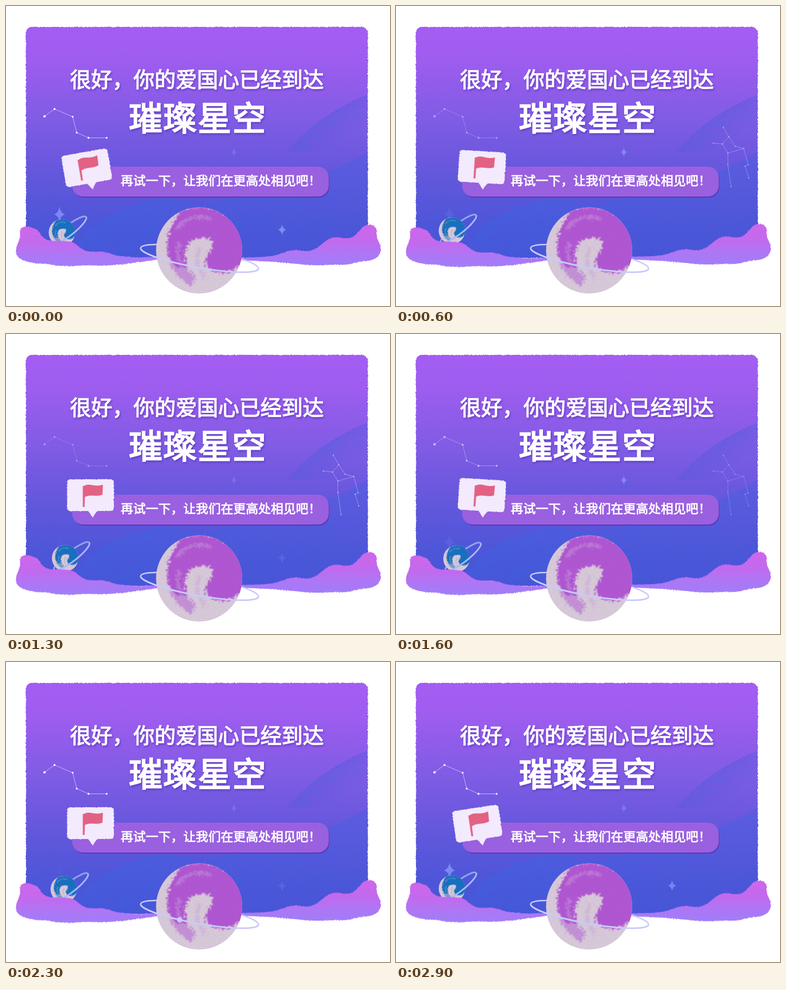
These frames come from a looping animation (847x661 px, 3000 ms). An HTML page:

```html
<!DOCTYPE html>
<html lang="zh-CN">
<head>
<meta charset="utf-8">
<style>
  html, body { margin: 0; width: 100%; height: 100%; overflow: hidden; background: #fff; }
  main { position: relative; width: 847px; height: 661px; max-height: 100%; overflow: hidden; contain: strict; }
  svg { position: absolute; left: 0; top: 0; width: 847px; height: 661px; will-change: transform; }
  text { font-family: "Noto Sans CJK SC", "Noto Sans CJK", sans-serif; fill: #fff; stroke: #fff; stroke-miterlimit: 2; }
  .shadow { filter: drop-shadow(2px 3px 2px rgba(70, 35, 165, .5)); }
  .line { fill: none; stroke: #cfcaff; stroke-width: 1; }
  .ring { fill: none; stroke: #c9cafb; stroke-width: 3.6; }
</style>
</head>
<body>
<main>

<!-- Card, hills, banner and text -->
<svg viewBox="0 0 847 661">
  <defs>
    <linearGradient id="sky" x2="0" y2="1">
      <stop offset="0" stop-color="#a45df2"/><stop offset=".13" stop-color="#9f5df0"/>
      <stop offset=".4" stop-color="#805be4"/><stop offset=".65" stop-color="#6258dc"/>
      <stop offset=".85" stop-color="#4e56d8"/><stop offset="1" stop-color="#4655d6"/>
    </linearGradient>
    <linearGradient id="cloud" x2="0" y2="1">
      <stop offset="0" stop-color="#cf66ea"/><stop offset=".4" stop-color="#c26aee"/>
      <stop offset=".75" stop-color="#ab78f6"/><stop offset="1" stop-color="#a27cf9"/>
    </linearGradient>
    <linearGradient id="fade" x1=".25" y1=".25" x2=".85" y2=".9">
      <stop offset="0" stop-opacity=".6"/><stop offset=".45" stop-opacity=".5"/><stop offset="1" stop-opacity=".34"/>
    </linearGradient>
    <linearGradient id="dusk" x1=".25" y1=".25" x2=".7" y2=".8">
      <stop offset="0" stop-color="#5a4fd0" stop-opacity=".4"/><stop offset="1" stop-color="#5a4fd0" stop-opacity="0"/>
    </linearGradient>
    <linearGradient id="blue" x2=".25" y2="1">
      <stop offset="0" stop-color="#3f5fe0" stop-opacity=".3"/><stop offset="1" stop-color="#4156d6" stop-opacity=".05"/>
    </linearGradient>
    <filter id="rough" x="-5%" y="-5%" width="110%" height="110%">
      <feTurbulence type="fractalNoise" baseFrequency=".35" numOctaves="2" seed="4"/>
      <feDisplacementMap in="SourceGraphic" scale="3.5" xChannelSelector="R" yChannelSelector="G"/>
    </filter>
    <filter id="brush" x="-10%" y="-10%" width="120%" height="120%">
      <feTurbulence type="fractalNoise" baseFrequency=".22" numOctaves="3" seed="9"/>
      <feDisplacementMap in="SourceGraphic" scale="22" xChannelSelector="R" yChannelSelector="G"/>
      <feGaussianBlur stdDeviation="1"/>
    </filter>
    <filter id="dots" x="0" y="0" width="1" height="1" color-interpolation-filters="sRGB">
      <feTurbulence type="fractalNoise" baseFrequency=".55" numOctaves="2" seed="2"/>
      <feColorMatrix values="0 0 0 0 0  0 0 0 0 0  0 0 0 0 0  1 0 0 0 0"/>
      <feComposite in2="SourceGraphic" operator="arithmetic" k2="1" k3="1" k4="-1"/>
      <feComponentTransfer result="mask"><feFuncA type="linear" slope="6"/></feComponentTransfer>
      <feFlood flood-color="#3f68e6"/>
      <feComposite in2="mask" operator="in"/>
    </filter>
    <filter id="grain" x="0" y="0" width="1" height="1" color-interpolation-filters="sRGB">
      <feTurbulence type="fractalNoise" baseFrequency=".8" numOctaves="2" seed="7"/>
      <feColorMatrix values="0 0 0 0 .5  0 0 0 0 .35  0 0 0 0 .6  2.4 0 0 0 -1.1" result="n"/>
      <feComposite in="n" in2="SourceGraphic" operator="in"/>
    </filter>
    <clipPath id="card"><rect x="44" y="46" width="754" height="509" rx="14"/></clipPath>
    <clipPath id="globe"><circle cx="426" cy="538.5" r="95"/></clipPath>

    <path id="hillR" d="M618 322C660 272 720 225 798 195V322Z"/>
    <path id="hillA" d="M140 557C170 475 260 440 345 424C520 440 420 500 230 557Z"/>
    <path id="hillB" d="M230 557C300 455 420 440 520 420C620 395 720 370 798 322V557Z"/>

    <!-- Marbled planet, tinted by currentColor -->
    <g id="marble" clip-path="url(#globe)">
      <rect x="330" y="442" width="192" height="193" fill="#d9ccda"/>
      <g filter="url(#brush)">
        <path d="M372 560C384 584 396 596 414 606" fill="none" stroke="currentColor" stroke-width="26" opacity=".5"/>
        <path d="M385 452C440 425 515 455 545 535C530 565 500 588 472 588C448 584 436 570 441 556C448 540 460 530 456 519C446 505 416 508 403 522C394 540 392 555 400 576C385 585 362 570 356 540C354 500 365 480 385 452Z" fill="currentColor"/>
        <path d="M376 492C394 468 420 460 452 468M384 520C376 540 378 560 390 580" fill="none" stroke="#d9ccda" stroke-width="7" opacity=".3"/>
        <path d="M428 530C416 555 420 575 440 600" fill="none" stroke="currentColor" stroke-width="8" opacity=".15"/>
      </g>
      <circle cx="426" cy="538.5" r="95" filter="url(#grain)" opacity=".22"/>
    </g>
  </defs>

  <rect x="44" y="46" width="754" height="509" rx="14" fill="url(#sky)" filter="url(#rough)"/>
  <g clip-path="url(#card)">
    <use href="#hillR" fill="url(#dusk)"/>
    <use href="#hillA" fill="url(#blue)"/>
    <use href="#hillB" fill="url(#blue)"/>
    <g fill="url(#fade)" opacity=".6">
      <use href="#hillR" filter="url(#dots)"/>
      <use href="#hillA" filter="url(#dots)"/>
      <use href="#hillB" filter="url(#dots)"/>
    </g>
  </g>

  <rect x="148" y="356" width="565" height="66" rx="24" fill="#5531ae"/>
  <rect x="146" y="354" width="566" height="66" rx="24" fill="#9960df"/>

  <g class="shadow">
    <text x="141" y="179" font-size="46.7" stroke-width="1.5">很好，你的爱国心已经到达</text>
    <text x="271" y="273.500" font-size="74" letter-spacing="2" stroke-width="2.8">璀璨星空</text>
  </g>
  <text x="253" y="394.500" font-size="27.6" stroke-width="1">再试一下，让我们在更高处相见吧！</text>
</svg>

<!-- Stars and constellations -->
<svg viewBox="0 0 847 661">
  <g id="twinkles" fill="#8798fa"></g>
  <g id="dipper"></g>
  <g id="hunter"></g>
</svg>

<!-- Small planet -->
<svg id="small" viewBox="0 0 847 661">
  <path class="ring" transform="translate(138 495) rotate(-38)" d="M-49 0A49 11 0 0 1 49 0" style="stroke:#8fa5ef"/>
  <use href="#marble" color="#156fc0" transform="translate(123.5 499) scale(.308) translate(-426 -538.5)"/>
  <path class="ring" transform="translate(138 495) rotate(-38)" d="M-49 0A49 11 0 0 0 49 0" style="stroke:#a9b9f8"/>
</svg>

<svg id="cloudL" viewBox="0 0 847 661">
  <path fill="url(#cloud)" filter="url(#rough)" d="M22 540C22 525 33 515 31 500C28 485 48 482 60 490C78 493 74 513 97 517C125 519 140 515 155 525C170 540 180 543 205 541C225 541 235 550 262 552C290 555 310 554 345 552V557C280 566 250 572 200 572C160 570 150 575 125 573C100 572 90 566 70 568C45 563 22 560 22 540Z"/>
</svg>
<svg id="cloudR" viewBox="0 0 847 661">
  <path fill="url(#cloud)" filter="url(#rough)" d="M505 554C550 554 580 553 595 549C620 542 625 537 645 538C670 543 680 538 695 526C715 509 725 507 745 512C775 513 775 495 788 486C800 477 820 482 818 500C815 515 828 522 827 537C826 553 810 562 790 562C770 564 760 572 730 570C700 570 690 573 660 570C620 566 580 562 505 560Z"/>
</svg>

<!-- Large planet -->
<svg viewBox="0 0 847 661">
  <path class="ring" transform="translate(427 556) rotate(10)" d="M-132 0A132 20.5 0 0 1 132 0" style="stroke-width:3"/>
  <use href="#marble" color="#b156d3"/>
  <path class="ring" transform="translate(427 556) rotate(10)" d="M-132 0A132 20.5 0 0 0 132 0"/>
</svg>

<svg viewBox="0 0 847 661"><circle id="moon" r="6" fill="#c9cafb"/></svg>

<!-- Speech bubble with flag -->
<svg id="bubble" viewBox="0 0 847 661" style="transform-origin:190px 404px">
  <path fill="#f3eafd" filter="url(#rough)" d="M143 320H230Q238 320 238 328V382Q238 390 230 390H201L191 404L181 390H143Q135 390 135 382V328Q135 320 143 320Z"/>
  <path fill="#e26283" d="M169.500 335L173.500 334C185 328 195 338 214 332L213 354C198 360 190 352 174 359L173.500 381H169.500Z"/>
</svg>

</main>
<script>
const el = id => document.getElementById(id);
const TAU = Math.PI * 2;
const wave = (t, shift = 0) => Math.cos(TAU * (t + shift) / 1000);

function constellation(id, lines) {
  const dots = lines.flat().map(([x, y, r = 1.3]) => `<circle cx="${x}" cy="${y}" r="${r}" fill="#fff"/>`);
  el(id).innerHTML = lines.map(l => `<polyline class="line" points="${l.map(p => p.slice(0, 2)).join(' ')}"/>`).join('') + dots.join('');
}
constellation('dipper', [[[85, 243, 2.6], [107, 227, 2.2], [147, 244, 2], [156, 279, 2], [182, 290.5, 2.2], [222, 290.5, 2]]]);
constellation('hunter', [
  [[722, 267], [734, 288], [720, 304], [700, 302]],
  [[734, 288], [748, 309], [767, 314], [732, 324], [720, 304]],
  [[732, 324], [732, 349], [739, 398]],
  [[767, 314], [777, 350], [770, 353], [778, 379]]
]);

// Each star: x, y, half width, half height, opacity over time
const stars = [
  [118, 459, 12, 17, t => .45 + .55 * wave(t, 80)],
  [502.5, 322, 7, 10, t => .65 - .35 * wave(t, -150)],
  [609, 493, 9, 12, t => .45 + .55 * wave(t)]
];
el('twinkles').innerHTML = stars.map(([x, y, w, h]) => {
  const a = w * .18, b = h * .18;
  return `<path transform="translate(${x} ${y})" d="M0 ${-h}Q${a} ${-b} ${w} 0Q${a} ${b} 0 ${h}Q${-a} ${b} ${-w} 0Q${-a} ${-b} 0 ${-h}Z"/>`;
}).join('');

// Drift of the small planet: time, x, y
const drift = [[0, 0, 0], [600, 0, -4], [1000, 4, -6.5], [1600, 10, -4], [2000, 7, 1], [2300, 4, 1.5], [2900, 0, 0], [3000, 0, 0]];
function driftAt(t) {
  const i = drift.findIndex(k => k[0] > t), a = drift[i - 1], b = drift[i];
  const p = (t - a[0]) / (b[0] - a[0]);
  return [1, 2].map(n => a[n] + (b[n] - a[n]) * p);
}

const move = (id, x, y) => el(id).style.transform = `translate(${x}px, ${y}px)`;

function draw(now) {
  const t = now % 3000;
  stars.forEach((s, i) => el('twinkles').children[i].setAttribute('opacity', Math.max(0, s[4](t)) * .8));

  const hunter = Math.max(0, 1 - Math.abs(t - 1000) / 1000);
  el('hunter').setAttribute('opacity', hunter * .85);
  el('dipper').setAttribute('opacity', 1 - hunter);

  move('small', ...driftAt(t));
  const sway = (1 - wave(t)) / 2;
  move('cloudL', 0, 2 * sway);
  move('cloudR', 0, -2 * sway);
  el('bubble').style.transform = `rotate(${-2.5 - 7.5 * wave(t)}deg)`;

  // The moon crosses the front of the ring once per loop
  const p = (t - 2045) / 640, a = Math.PI * p;
  const x = -132 * Math.cos(a), y = 20.5 * Math.sin(a);
  el('moon').setAttribute('transform', `translate(427 556) rotate(10) translate(${x} ${y})`);
  el('moon').setAttribute('opacity', p > 0 && p < 1 ? Math.min(1, p * 6, (1 - p) * 6) : 0);
}

let start;
function loop(now) {
  start ??= now;
  draw(now - start);
  requestAnimationFrame(loop);
}
requestAnimationFrame(loop);
</script>
</body>
</html>
```
